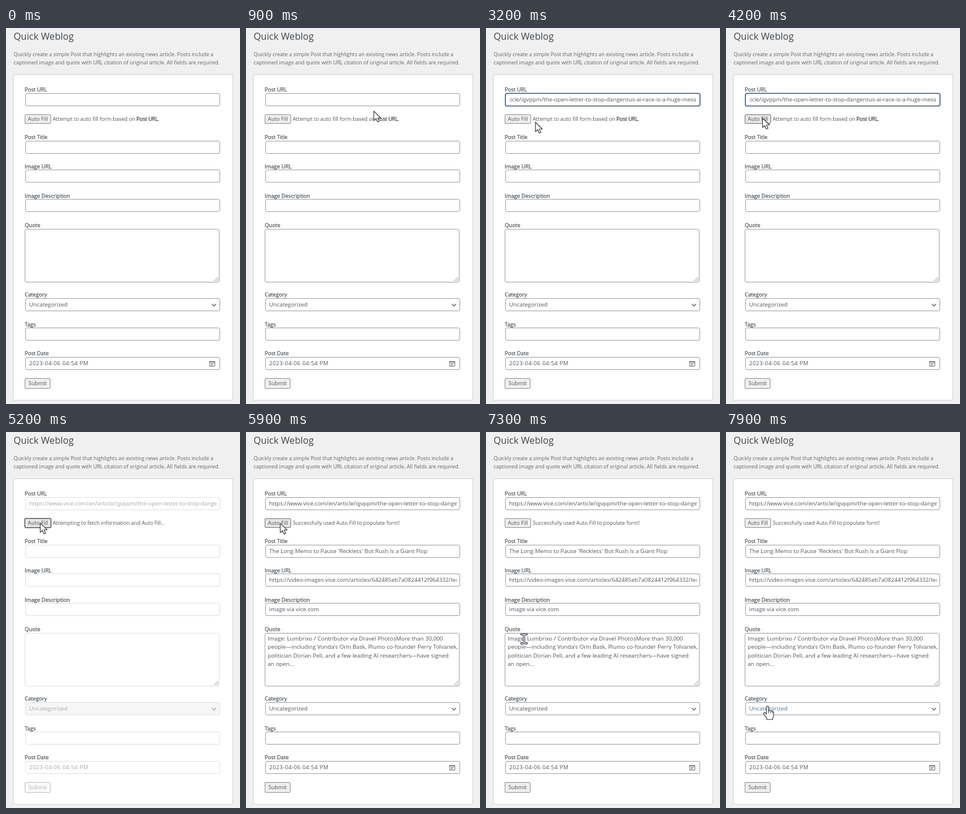
An HTML page that plays this animation: 400x640 px, repeating every 8 s.

```html
<!DOCTYPE html>
<html lang="en">
<head>
<meta charset="utf-8">
<title>Quick Weblog</title>
<style>
html, body { margin: 0; width: 100%; height: 100%; overflow: hidden; }
body { background: #f0f0f0; }
#stage {
  position: relative; width: 400px; height: 640px; overflow: hidden;
  background: #f0f0f0; color: #50565c;
  font: 8.88px/14px "Open Sans", "Noto Sans", sans-serif;
}
#stage > * { position: absolute; box-sizing: border-box; margin: 0; white-space: nowrap; }
h1 { left: 13px; top: 3px; font-size: 16.1px; line-height: 22px; font-weight: 400; color: #42474c; }
.intro { left: 13px; top: 38px; color: #62676c; }
.card { left: 12px; top: 79px; width: 376px; height: 555px; background: #fff; border: 1px solid #d2d3d5; }
label { left: 32px; top: calc(var(--y) * 1px); font-size: 9.15px; }
label, #note b { font-weight: 400; -webkit-text-stroke: .25px; }
.field {
  left: 33px; top: calc(var(--y) * 1px); width: 333px; height: 22px;
  border: 1px solid #9c9fa3; border-radius: 3px; background: #fff;
  padding: 0 5.5px; font-size: 9.75px; line-height: 20px;
}
.clip { position: relative; height: 20px; width: 320px; overflow: hidden; }
.clip span { position: absolute; left: 0; }
.scrolled .clip span { left: auto; right: 0; }
#quote { left: 32px; height: 91px; padding: 2px 4px; line-height: 14.4px; }
#quote span { white-space: pre; }
#date { letter-spacing: .42px; font-size: 9.55px; }
.field svg { position: absolute; fill: none; stroke: #555a60; }
.caret { position: absolute; top: 3px; width: 1px; height: 14px; background: #8a8d91; visibility: hidden; }
.button {
  left: 32px; border: 1px solid #8b8d8f; border-radius: 2px; background: #efefef;
  text-align: center;
}
#fill { top: 147px; width: 45px; height: 16px; font-size: 9.2px; line-height: 14px; }
#submit { top: 596px; width: 44px; height: 18px; font-size: 9.5px; line-height: 16px; }
#note { left: 80px; top: 148px; }
#note b { color: #3a3f45; }

.focused #url { border-color: #3f5a76; box-shadow: 0 0 0 .6px #3f5a76; }
.over #fill { background: #e6e6e6; border-color: #707274; }
.busy #fill { border-color: #55585b; box-shadow: 0 0 0 .5px #55585b; }
.busy .field { border-color: #dfe0e2; color: #a4a8ab; }
.busy #category { background: #f6f6f7; }
.busy #category svg { opacity: .55; }
.busy #calendar { display: none; }
.busy #submit { border-color: #bfc0c1; color: #b2b5b8; background: #fafafa; }
.choose #category { color: #47708f; }

#pointer { left: 0; top: 0; width: 1px; height: 1px; overflow: visible; fill: #fff; stroke: #3c3f44; stroke-linejoin: round; }
#pointer g { display: none; }
#pointer .on { display: block; }
</style>
</head>
<body>
<div id="stage">
  <h1>Quick Weblog</h1>
  <p class="intro">Quickly create a simple Post that highlights an existing news article. Posts include a<br>captioned image and quote with URL citation of original article. All fields are required.</p>
  <div class="card"></div>

  <label style="--y:98">Post URL</label>
  <div class="field" id="url" style="--y:111"><div class="clip"><span></span></div><i class="caret"></i></div>
  <div class="button" id="fill">Auto Fill</div>
  <div id="note"></div>

  <label style="--y:178.5">Post Title</label>
  <div class="field" style="--y:192"><div class="clip"><span data-fill="The Long Memo to Pause 'Reckless' Bot Rush Is a Giant Flop"></span></div></div>
  <label style="--y:228.5">Image URL</label>
  <div class="field" style="--y:241"><div class="clip"><span data-fill="https://video-images.vice.com/articles/642485eb7a0824412f964332/led"></span></div></div>
  <label style="--y:278.5">Image Description</label>
  <div class="field" style="--y:291"><div class="clip"><span data-fill="image via vice.com"></span></div></div>

  <label style="--y:328.5">Quote</label>
  <div class="field" id="quote" style="--y:342"><span data-fill="Image: Lumbrixo / Contributor via Dravel PhotosMore than 30,000
people—including Vonda's Orin Bask, Plumo co-founder Perry Tolvanek,
politician Dorian Pell, and a few leading AI researchers—have signed
an open..."></span><svg style="right:1px;bottom:1px" width="7" height="7"><path d="M0 7 7 0M4 7 7 4" stroke-width=".7"/></svg></div>

  <label style="--y:447">Category</label>
  <div class="field" id="category" style="--y:460">Uncategorized<svg style="left:317px;top:8px" width="9" height="6"><path d="M1 .8 4.5 4.3 8 .8" stroke-width="1.3"/></svg></div>
  <label style="--y:497.5">Tags</label>
  <div class="field" style="--y:510"></div>
  <label style="--y:547">Post Date</label>
  <div class="field" id="date" style="--y:560">2023-04-06 04:54 PM<svg id="calendar" style="left:313px;top:5px" width="11" height="11"><path d="M1 1.5H10V9.5H1ZM1 3H10M3 5.5H8M3 7.5H6" stroke-width=".9"/></svg></div>
  <div class="button" id="submit">Submit</div>

  <svg id="pointer">
    <g id="arrow"><path d="M.5 .5V16.5L4.2 13.1 7 19 9.8 17.7 7.1 12H12.3Z" stroke-width="1.2"/></g>
    <g id="beam"><path d="M-5.5-9H-1.5L0-8.2 1.5-9H5.5V-6.6H1.3V6.6H5.5V9H1.5L0 8.2-1.5 9H-5.5V6.6H-1.3V-6.6H-5.5Z" stroke-width="1.1"/></g>
    <g id="hand"><path d="M-1.8 13V1.2C-1.8-.8 1.8-.8 1.8 1.2V8C2 6 5.2 6 5.2 8.4 5.6 6.8 8.2 7 8.2 9 9 8 10.4 8.6 10.4 10.2V15C10.4 18 8.6 19 8.6 22.5H-.8C-.8 20-4.4 16.6-6.6 12.6-7.4 10.8-5 9.6-3.8 11Z" stroke-width="1.2"/><path d="M1.8 8V12M5.2 8.5V12M8.2 9.5V12" fill="none"/></g>
  </svg>
</div>
<script>
const LOOP = 8000, STEP = 100;
const CLICK = 1800, PASTE = 2600, SEND = 4700, DONE = 5500;
const ADDRESS = 'https://www.vice.com/en/article/qjvppm/the-open-letter-to-stop-dangerous-ai-race-is-a-huge-mess';

// Pointer waypoints: time, x, y
const PATH = [
  [100, 366, 318], [500, 265, 195], [900, 218, 141], [1400, 203, 126],
  [2800, 203, 126], [3200, 84, 160], [3700, 62, 153], [4200, 62, 153],
  [4400, 58, 154], [6200, 58, 155], [6400, 59, 178], [6800, 62, 274],
  [7300, 65, 352], [7900, 71, 467]
];
const TEXT_AREAS = [[111, 133], [192, 214], [241, 263], [291, 313], [342, 433]];

const $ = s => document.querySelector(s);
const stage = $('#stage'), pointer = $('#pointer'), caret = $('.caret'), note = $('#note');
const address = $('#url span');
const answers = [...document.querySelectorAll('[data-fill]')];

function setText(el, html) {
  if (el.shown !== html) el.innerHTML = el.shown = html;
}

function position(t) {
  const i = PATH.findIndex(p => p[0] > t);
  if (i < 0) return PATH[PATH.length - 1].slice(1);
  const [a, b] = [PATH[i - 1], PATH[i]];
  const k = (t - a[0]) / (b[0] - a[0]);
  return [1, 2].map(n => a[n] + (b[n] - a[n]) * k);
}

function shapeAt(x, y) {
  if (x < 32 || x > 366) return 'arrow';
  if (y >= 460 && y < 482) return 'hand';
  return TEXT_AREAS.some(([top, end]) => y >= top && y < end) ? 'beam' : 'arrow';
}

// Moves the pointer and tells which control it is over
function drawPointer(t) {
  const visible = t >= PATH[0][0];
  pointer.style.display = visible ? 'block' : 'none';
  if (!visible) return {};
  const [x, y] = position(t), shape = shapeAt(x, y);
  pointer.style.transform = `translate(${x}px, ${y}px)`;
  for (const g of pointer.children) g.classList.toggle('on', g.id === shape);
  return { over: x > 32 && x < 77 && y > 147 && y < 163, choose: shape === 'hand' };
}

function draw(t) {
  const { over = false, choose = false } = drawPointer(t);
  const pasted = t >= PASTE, focused = t >= CLICK && t < SEND;
  const busy = t >= SEND && t < DONE, done = t >= DONE;
  const state = { over, choose, focused, busy, scrolled: pasted && focused };
  for (const name in state) stage.classList.toggle(name, state[name]);

  const blinkOn = (t - (pasted ? PASTE : CLICK)) % 1000 < 500;
  caret.style.visibility = focused && blinkOn ? 'visible' : 'hidden';
  caret.style.left = pasted ? '325px' : '5px';

  setText(address, pasted ? ADDRESS : '');
  setText(note, done ? 'Successfully used Auto Fill to populate form!'
    : busy ? 'Attempting to fetch information and Auto Fill...'
    : 'Attempt to auto fill form based on <b>Post URL</b>.');
  for (const el of answers) setText(el, done ? el.dataset.fill : '');
}

const start = performance.now();
function tick() {
  const t = (performance.now() - start) % LOOP;
  draw(Math.floor(t / STEP) * STEP);
  requestAnimationFrame(tick);
}
tick();
</script>
</body>
</html>
```
